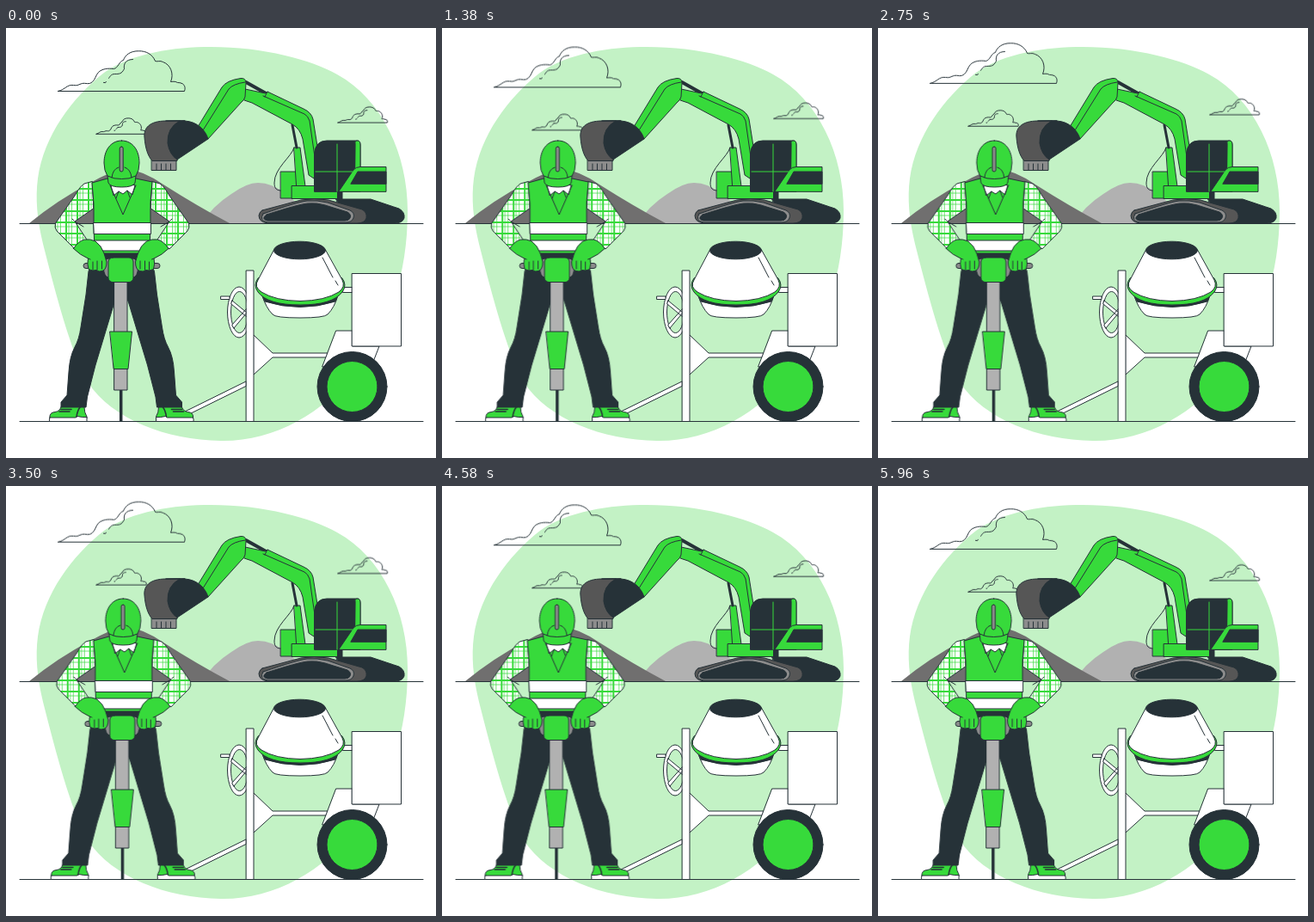
Recreate the animation shown at these times as an HTML page. Size 500 by 500 pixels, loop 6000 ms.

```html
<!DOCTYPE html>
<html lang="en">
<head>
<meta charset="utf-8">
<title>Construction site</title>
<style>
  html, body { margin: 0; width: 100%; height: 100%; overflow: hidden; background: #fff; }
  svg { display: block; width: 100vw; height: 100vh; }
  .ink { stroke: #263238; stroke-width: 1; stroke-linejoin: round; stroke-linecap: round; }
  .g { fill: #37da3b; }
  .d { fill: #263238; }
  .w { fill: #fff; }
  .n { fill: none; }
  .gray { fill: #b1b1b1; }
  .mid { fill: #8c8c8c; }
  .deep { fill: #565656; }
  .line { fill: none; vector-effect: non-scaling-stroke; }
  .pane { fill: none; stroke: #37da3b; }
  .clouds { animation: float 6s linear infinite; }
  .worker { animation: sway 3s linear infinite; }
  @keyframes float { 50% { transform: translateY(-10px); } }
  @keyframes sway {
    0%, 100% { transform: translateX(0); }
    16.7% { transform: translateX(1.7px); }
    27.8% { transform: translateX(2.7px); }
    52.8% { transform: translateX(-.7px); }
    65.3% { transform: translateX(-2px); }
    91.7% { transform: translateX(.7px); }
  }
</style>
</head>
<body>
<svg viewBox="0 0 500 500">
  <defs>
    <pattern id="plaid" width="13" height="13" patternUnits="userSpaceOnUse" patternTransform="translate(2 1)">
      <rect width="13" height="13" fill="#fff"/>
      <path d="M3 0V13M0 4H13" stroke="#37da3b" stroke-width="2"/>
      <path d="M6 0V13M9.500 0V13M0 9H13" stroke="#37da3b" stroke-width=".7"/>
    </pattern>

    <!-- base line runs from 0 to 147 at y = 0 -->
    <g id="cloud">
      <path class="line" d="M0 0H147C149-6 146-10 139-10C136-12 133-11 131-11C135-20 131-31 122-34C119-36 115-34 113-35C110-43 102-47 94-46.700C84-47 78-42 76-36C71-35 70-27 65-26C58-27 51-26 47-22C44-19 43-13 40-11C36-7 32-10 28-9C24-8 23-6 18-7C10-8 9-2 0 0Z"/>
      <path class="line" d="M87-37C79-37 76-32 77-26C74-20 71-20 66-20C61-20 60-16 59-15M56-11Q56-9 53-10"/>
    </g>

    <g id="arm">
      <path fill="url(#plaid)" d="M100 178.500L91 181Q86 184 80 195L57.500 227Q56 232 59 236L80 257L94 246L80 225L101.500 210Z"/>
      <path class="n" d="M80 225L90 231M79 224L77 222"/>
    </g>

    <g id="glove">
      <path class="g" d="M78.500 256.500Q84 248 91 246Q98 245 104 248Q111 253 114 262L117 272Q117 281 112 282.500Q108 284 105 281.500Q101 283 96 280.500Q94 274 95.500 268Q86 264 78.500 256.500Z"/>
      <path class="n" d="M101 281V272M106 281V271M111.500 280V271M95.500 268L98 269"/>
    </g>

    <g id="leg">
      <path class="d" d="M107 260H134.500V300L126 319L104 392L94.500 429L93 441H64V435L71 427L73 400Q74 382 80 371Q85 362 87 348L93 310L96 283Z"/>
      <path class="g" d="M64 441H91Q91 447 94 452V454H51Q50 447 57 446.500Q62 446 64 441Z"/>
      <path class="w" d="M51 453H81L83 451.500Q89 453 94 452.500V457.500H50.500Q50 455 51 453Z"/>
      <path class="n" stroke-width="1.600" d="M64 443.500H76M62 446H74M82 452Q83 445 86 441"/>
    </g>
  </defs>

  <path fill="#c3f2c5" d="M238 22C300 22 355 37 385 54C438 83 467 148 467 212C467 290 445 345 408 396C370 449 310 481 250 480C186 479 124 455 95 412C75 375 58 310 43 251C36 222 34 198 37 175C44 125 77 81 114 52C147 29 195 22 238 22Z"/>

  <g class="ink clouds">
    <use href="#cloud" x="60.500" y="73.500"/>
    <use href="#cloud" transform="translate(105 123.300) scale(.395)"/>
    <use href="#cloud" transform="translate(386 110) scale(.39)"/>
  </g>

  <path class="gray" d="M228 227Q240 207 262 193Q280 180 293 180Q309 180 326 193Q345 208 356 227Z"/>
  <path fill="#706f6f" d="M27 227Q60 200 98 180Q121 167 138 163Q160 166 183 182Q224 208 260 227Z"/>

  <!-- excavator -->
  <g class="ink">
    <path class="d" d="M384 199H424Q445 206 457 210Q464 214 463 221Q461 227 452 227H396Z"/>
    <path class="deep" d="M298 212L343 200Q358 197 375 200L414 211Q420 214 419 221Q417 227 408 227H305Q294 226 294 218Q295 213 298 212Z"/>
    <path class="mid" d="M299 216Q340 202 350 201Q362 200 374 203L400 212Q406 215 404 221Q402 226 395 226H304Q294 224 299 216Z"/>
    <path class="d" d="M303 217Q340 205 351 204Q361 203 371 206L397 214Q402 217 400 221Q399 224 394 224H304Q296 222 303 217Z"/>

    <path class="n" d="M335 139C332 150 312 163 312 180C312 187 315 189 320 189"/>
    <rect class="g" x="319.500" y="167" width="21" height="31"/>
    <path class="g" d="M335 139H342L348 184H338Z"/>
    <path class="n" stroke-width="3" d="M333 113L338 139"/>
    <path class="n" stroke-width="4" d="M279 63L304 77"/>
    <path class="g" d="M278 71L297 75L302 76L304 74L346 94Q355 98 357 106L364 150L358 175L352 171L345 129Q342 117 333 112L286 87L277 84Z"/>
    <path class="n" d="M301 80L304 74M299 79L347 100Q351 102 353 108L359 150"/>
    <rect class="g" x="332.500" y="183.500" width="53" height="15"/>

    <path class="g" d="M223 115L251 69Q256 61 273 58.500Q279 58 279 64L278 80Q277 84 273 87L235 129Z"/>
    <path class="n" d="M229 119L259 71Q264 65 278 63"/>
    <rect class="mid" x="169.500" y="153" width="28.500" height="12.500"/>
    <path class="n" d="M175 158V165M180.500 158V165M186 158V165M191.500 158V165"/>
    <path class="deep" d="M186 108C166 108 160 117 161 127C162 140 165 149 170 154.500H199L208 108Z"/>
    <path class="d" d="M186 108H208C223 109 232 119 235 129L199 153Q190 147 188 134Q187 116 202 108Z"/>

    <path class="d" d="M386 190H391V199H386ZM358.500 190V146Q360 131 373 131H408Q412 131 412 136V190Z"/>
    <path class="g" d="M406 134Q405 131 409 131Q412 131 412 136V162L406 166Z"/>
    <path class="g" d="M387 190L404 165Q407 161.500 412 161.500H442V190Z"/>
    <path class="d" d="M401 181L409 167H442V181Z"/>
    <path class="pane" d="M385 135V190M360 167H403"/>
  </g>

  <path class="ink" d="M16 227.500H485M16 457.500H485"/>

  <!-- mixer -->
  <g class="ink">
    <path class="w" d="M279 411L207 446.500L213 449L279 416.500Z"/>
    <path class="w" fill-rule="evenodd" d="M257.500 330.500A13.500 29.500 0 0 1 284.500 330.500A13.500 29.500 0 0 1 257.500 330.500ZM261.500 330.500A10 24 0 0 0 281.500 330.500A10 24 0 0 0 261.500 330.500Z"/>
    <path class="w" d="M263 317L280 331V336L262 321ZM263 345L280 326V331L265 349Z"/>
    <path class="w" d="M250 312H260V315.500H250Z"/>
    <path class="w" d="M288 357L310 378H374V383H310L288 403Z"/>
    <path class="w" d="M384 352H403V370H434L427 388V394H368Z"/>
    <rect class="w" x="279.500" y="282" width="8.500" height="175.500"/>
    <rect class="w" x="392" y="301.500" width="11" height="6"/>
    <rect class="w" x="402.500" y="285.500" width="57" height="84.500"/>

    <path class="w" d="M298 311Q302 325 310 333Q313 337 342 337Q370 337 374 333Q382 325 386 311Z"/>
    <path class="d" d="M298 311Q342 322 386 311L383 318Q342 331 301 318Z"/>
    <path class="g" d="M293 291Q287 299 293 307Q304 322 342 322Q380 322 391 307Q397 299 391 291Z"/>
    <path class="w" d="M311.500 258L293 293Q288 301 297 307Q313 317 342 317.500Q371 317 387 307Q395 301 391 293L371.500 258Z"/>
    <ellipse class="d" cx="341.500" cy="258.500" rx="30" ry="10.300"/>
    <path class="n" d="M368 267L380 290M383 294L386 299"/>

    <circle class="d" cx="402.500" cy="417" r="40.500"/>
    <circle class="g" cx="402.500" cy="417" r="29.500"/>
  </g>

  <!-- worker -->
  <g class="ink worker">
    <use href="#leg"/>
    <use href="#leg" transform="translate(268.500) scale(-1 1)"/>
    <use href="#arm"/>
    <use href="#arm" transform="translate(270) scale(-1 1)"/>

    <path class="g" d="M118 175L100 180Q103 205 102 227L103 262H167L168 227Q167 202 170 179L151 175Z"/>
    <path class="w" d="M102 226.500H168.500V239.500H102.500ZM103 247H167.500L166 259H104Z"/>
    <path class="w" d="M122 183L125 195L131 190L136 193L141 189L147 194L150 183Z"/>
    <path class="n" d="M121 183L136 217L151 183M131 190L128 198M141 189L144 197"/>
    <path class="d" d="M108 264H162V269H108Z"/>

    <path class="g" d="M134.500 131C121 131 114 143 114 157Q114 166 118 172L119 180Q121 185 134.500 185Q148 185 150 180L151 172Q155 166 155 157C155 143 148 131 134.500 131Z"/>
    <path class="n" d="M118 172Q126 176 134.500 175.500Q143 176 151 172M123 174Q124 164 131 162M138 162Q145 164 146 174"/>
    <rect class="mid" x="132.200" y="138" width="4" height="29" rx="2"/>

    <!-- drill -->
    <path stroke-width="3.500" stroke-linecap="butt" d="M133.700 421V457"/>
    <rect class="gray" x="126" y="294" width="15" height="127"/>
    <path class="g" d="M121 353H146.500L142 396.500H125.500Z"/>
    <rect class="mid" x="90" y="273.500" width="89" height="6" rx="3"/>
    <ellipse class="mid" cx="119" cy="279" rx="5.500" ry="11"/>
    <ellipse class="mid" cx="148" cy="279" rx="5.500" ry="11"/>
    <rect class="g" x="119" y="267" width="29" height="28.500" rx="5"/>
    <use href="#glove"/>
    <use href="#glove" transform="translate(267.500) scale(-1 1)"/>
  </g>
</svg>
</body>
</html>
```
